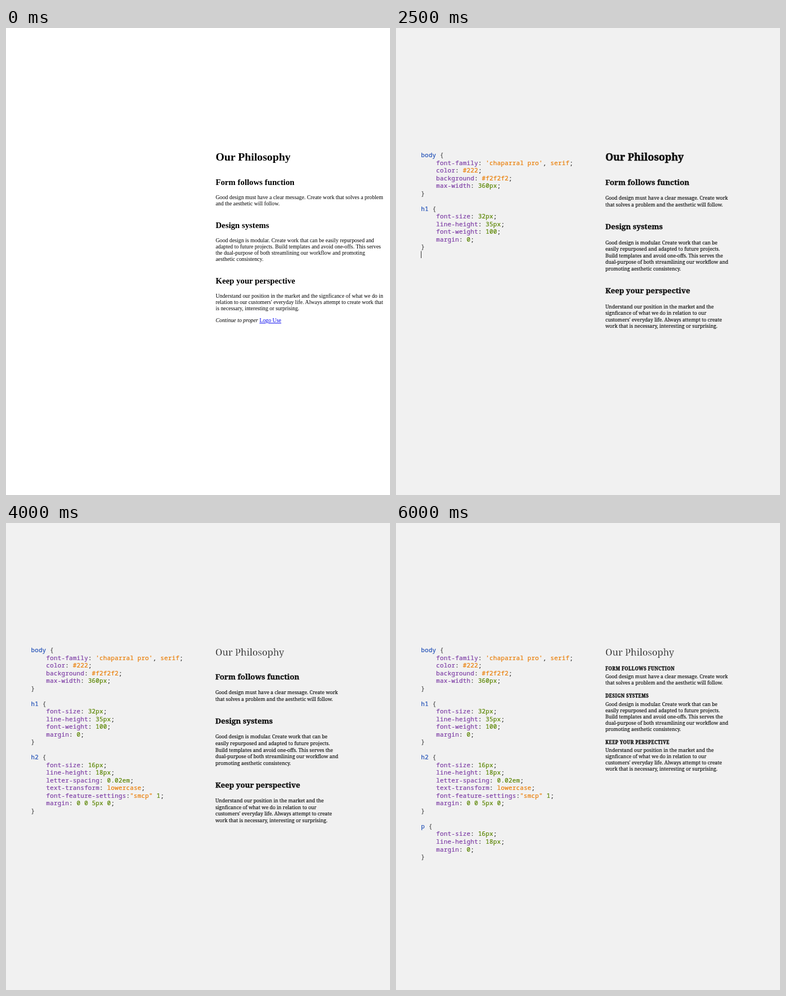
Write an HTML page that moves like this. It is 679 px wide and 824 px high and loops after 9000 ms.

```html
<!DOCTYPE html>
<html lang="en">
<head>
<meta charset="utf-8">
<title>Styling a page</title>
<style>
html, body { margin: 0; width: 100%; height: 100%; overflow: hidden; background: #fff; }
svg { display: block; width: 679px; height: 824px; }
text { white-space: pre; fill: currentColor; }
.plain { font-family: "Liberation Serif", "Times New Roman", serif; color: #000; }
.plain .h1 { font-size: 19.68px; font-weight: 700; }
.plain .h2 { font-size: 14.76px; font-weight: 700; }
.plain .p { font-size: 9.84px; }
.styled { font-family: "Noto Serif", serif; color: #111; stroke: currentColor; }
.styled .h1 { font-size: 17.7px; font-weight: 700; stroke-width: .5px; }
.styled .h2 { font-size: 13.25px; font-weight: 700; stroke-width: .35px; }
.styled .p { font-size: 8.63px; stroke-width: .15px; }
/* A stroke in the paper colour thins the letters. */
.thin .h1 { font-size: 16.5px; font-weight: 200; stroke: #f1f1f1; stroke-width: .35px; }
.caps .h2 { font-size: 8px; letter-spacing: .43px; text-transform: uppercase; }
.code { font: 10.8px "Noto Sans Mono", monospace; letter-spacing: .25px; color: #3a3a3a; }
.code tspan { fill: currentColor; stroke: currentColor; stroke-width: .22px; }
.sel { color: #2553b8; }
.prop { color: #7e3fa6; }
.word { color: #ea7d05; }
.num { color: #5a8500; }
.brace { color: #555; }
</style>
</head>
<body>
<svg id="stage" viewBox="0 0 679 824">
  <rect id="paper" width="679" height="824" fill="#f1f1f1"/>
  <rect id="caret" x="44" y="393.5" width="1" height="12.5" fill="#333"/>
</svg>
<script>
const LOOP = 9000;
const NS = "http://www.w3.org/2000/svg";
const stage = document.getElementById("stage");
const shown = [];

function add(parent, tag, attrs, text) {
  const el = document.createElementNS(NS, tag);
  for (const k in attrs) el.setAttribute(k, attrs[k]);
  if (text) el.textContent = text;
  return parent.appendChild(el);
}

function during(el, from, to) {
  shown.push({ el, from, to });
  return el;
}

const heads = ["Form follows function", "Design systems", "Keep your perspective"];

const wide = [
  ["Good design must have a clear message. Create work that solves a problem",
   "and the aesthetic will follow."],
  ["Good design is modular. Create work that can be easily repurposed and",
   "adapted to future projects. Build templates and avoid one-offs. This serves",
   "the dual-purpose of both streamlining our workflow and promoting",
   "aesthetic consistency."],
  ["Understand our position in the market and the signficance of what we do in",
   "relation to our customers' everyday life. Always attempt to create work that",
   "is necessary, interesting or surprising."]
];

const narrow = [
  ["Good design must have a clear message. Create work",
   "that solves a problem and the aesthetic will follow."],
  ["Good design is modular. Create work that can be",
   "easily repurposed and adapted to future projects.",
   "Build templates and avoid one-offs. This serves the",
   "dual-purpose of both streamlining our workflow and",
   "promoting aesthetic consistency."],
  ["Understand our position in the market and the",
   "signficance of what we do in relation to our",
   "customers' everyday life. Always attempt to create",
   "work that is necessary, interesting or surprising."]
];

// Baselines: one per heading, one per paragraph start, then the line pitch.
const pages = [
  { from: 0, to: 1500, look: "plain", x: 370.7, copy: wide,
    h: [277, 353, 451.3], p: [301.5, 377.7, 475.8], pitch: 11.07 },
  { from: 1500, to: 3000, look: "styled", x: 370.2, copy: narrow,
    h: [277.2, 355.4, 468.3], p: [303.4, 381.5, 494.5], pitch: 11.65 },
  { from: 3000, to: 4500, look: "styled thin", x: 370.2, copy: narrow,
    h: [276.1, 354.2, 467.1], p: [302.1, 380.2, 492.9], pitch: 11.65 },
  { from: 4500, to: 6000, look: "styled thin caps", x: 370.2, copy: narrow,
    h: [259.7, 326, 427.2], p: [281, 346.8, 448.4], pitch: 11.65 },
  { from: 6000, to: LOOP, look: "styled thin caps", x: 370.2, copy: narrow,
    h: [259.7, 308.2, 390], p: [274, 322.6, 404.2], pitch: 11.07 }
];

for (const { from, to, look, x, copy, h, p, pitch } of pages) {
  const page = during(add(stage, "g", { class: look }), from, to);
  add(page, "text", { class: "h1", x, y: 233.6 }, "Our Philosophy");
  heads.forEach((title, i) => {
    add(page, "text", { class: "h2", x, y: h[i] }, title);
    copy[i].forEach((line, n) =>
      add(page, "text", { class: "p", x, y: p[i] + n * pitch }, line));
  });
  if (look === "plain") {
    const t = add(page, "text", { class: "p", x, y: 519.3 });
    add(t, "tspan", { "font-style": "italic" }, "Continue to proper ");
    add(t, "tspan", { fill: "#0000ee", "text-decoration": "underline" }, "Logo Use");
  }
}

const rules = [
  { at: 1000, row: 0, sel: "body", body: [
    "font-family: 'chaparral pro', serif", "color: #222",
    "background: #f2f2f2", "max-width: 360px"] },
  { at: 2500, row: 7, sel: "h1", body: [
    "font-size: 32px", "line-height: 35px", "font-weight: 100", "margin: 0"] },
  { at: 4000, row: 14, sel: "h2", body: [
    "font-size: 16px", "line-height: 18px", "letter-spacing: 0.02em",
    "text-transform: lowercase", "font-feature-settings:\"smcp\" 1",
    "margin: 0 0 5px 0"] },
  { at: 5500, row: 23, sel: "p", body: [
    "font-size: 16px", "line-height: 18px", "margin: 0"] }
];

function codeLine(parent, row, indent, parts) {
  const t = add(parent, "text", { x: 44.2 + indent * 6.73, y: 228 + row * 13.52 });
  for (const [cls, s] of parts) add(t, "tspan", { class: cls }, s);
}

function tokens(decl) {
  const cut = decl.indexOf(":");
  const values = decl.slice(cut + 1).match(/'[^']*'|"[^"]*"|#\w+|[\w.]+|[ ,]+/g);
  const kind = s => /^\d/.test(s) ? "num" : /^[ ,]/.test(s) ? "mark" : "word";
  return [["prop", decl.slice(0, cut)], ["mark", ":"],
    ...values.map(s => [kind(s), s]), ["mark", ";"]];
}

for (const { at, row, sel, body } of rules) {
  const block = during(add(stage, "g", { class: "code" }), at, LOOP);
  codeLine(block, row, 0, [["sel", sel], ["brace", " {"]]);
  body.forEach((decl, i) => codeLine(block, row + 1 + i, 4, tokens(decl)));
  codeLine(block, row + 1 + body.length, 0, [["brace", "}"]]);
}

during(document.getElementById("paper"), 1500, LOOP);
during(document.getElementById("caret"), 2500, 4000);

function draw() {
  const t = performance.now() % LOOP;
  for (const { el, from, to } of shown)
    el.style.visibility = t >= from && t < to ? "visible" : "hidden";
  requestAnimationFrame(draw);
}
draw();
</script>
</body>
</html>
```
